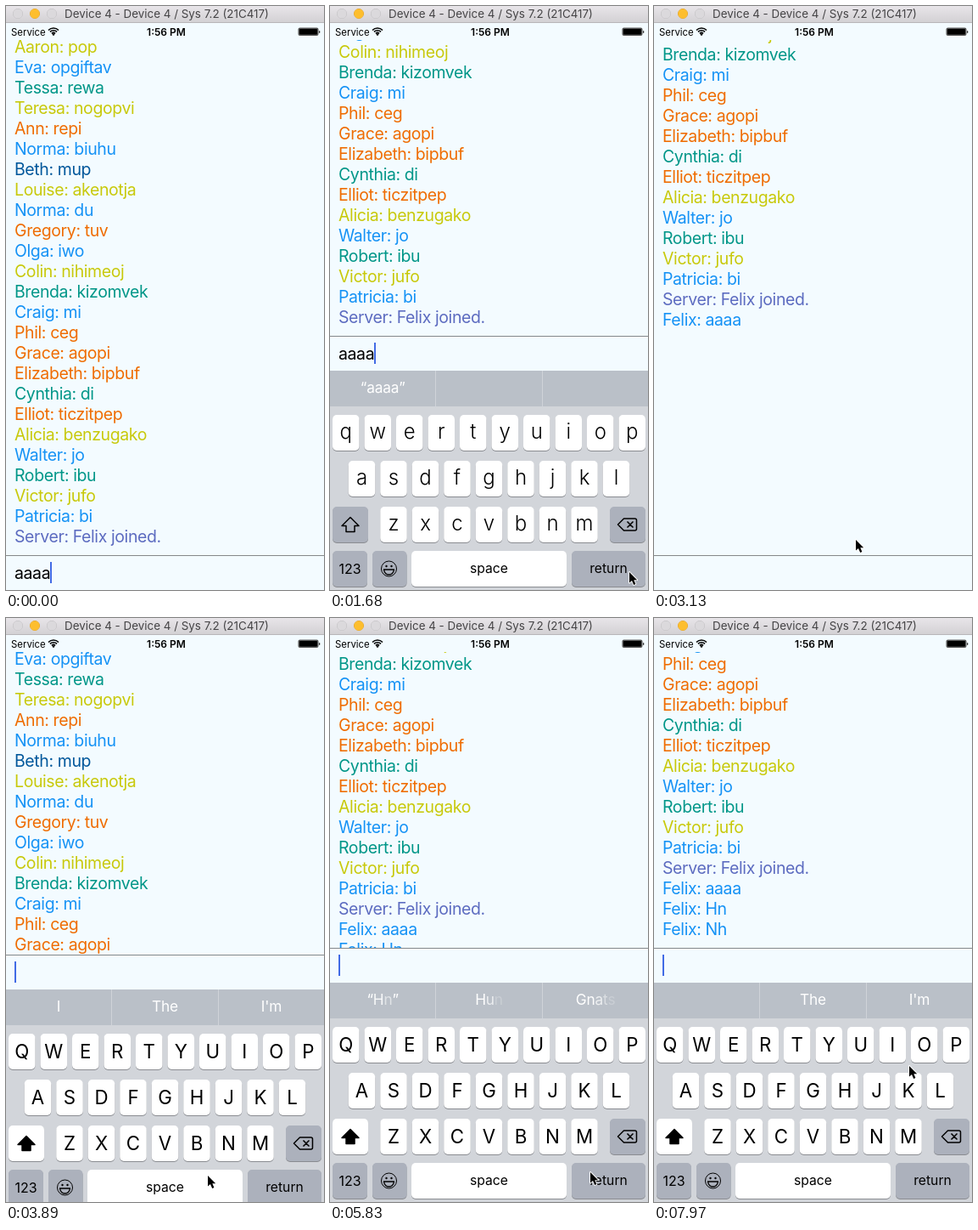
Write an HTML page with a canvas that moves like this. It is 375x687 px and loops after 8000 ms.

```html
<!DOCTYPE html>
<html lang="en">
<head>
<meta charset="utf-8">
<title>Chat keyboard</title>
<style>
  html, body { margin: 0; width: 100%; height: 100%; overflow: hidden; background: #f3fbff; }
  canvas { display: block; }
</style>
</head>
<body>
<canvas id="stage" width="375" height="687"></canvas>
<script>
const ctx = document.getElementById('stage').getContext('2d');
const W = 375, H = 687, LOOP = 8000, KEYBOARD = 258, ROW = 24;
const PAPER = '#f3fbff', KEY_GRAY = '#acb1bc';
const COLORS = { y: '#c8c90a', b: '#1592f5', t: '#009688', o: '#ef6c00', n: '#01579b', i: '#5c6bc0' };

const messages = [
  'y Aaron: pop', 'b Eva: opgiftav', 't Tessa: rewa', 'y Teresa: nogopvi', 'o Ann: repi',
  'b Norma: biuhu', 'n Beth: mup', 'y Louise: akenotja', 'b Norma: du', 'o Gregory: tuv',
  'b Olga: iwo', 'y Colin: nihimeoj', 't Brenda: kizomvek', 'b Craig: mi', 'o Phil: ceg',
  'o Grace: agopi', 'o Elizabeth: bipbuf', 't Cynthia: di', 'o Elliot: ticzitpep',
  'y Alicia: benzugako', 'b Walter: jo', 't Robert: ibu', 'y Victor: jufo', 'b Patricia: bi',
  'i Server: Felix joined.', 'b Felix: aaaa', 'b Felix: Hn', 'b Felix: Nh'
];

// Timelines, all in ms
const sends = [1960, 5800, 7690];
const inputs = [[0, 'aaaa'], [1960, ''], [4860, 'H'], [5640, 'Hn'], [5800, ''],
                [6600, 'N'], [7150, 'Nh'], [7690, '']];
const suggestions = [
  [-500, ['“aaaa”', '', '']], [1960, ['', '', '']], [2180, ['I', 'The', 'I\'m']],
  [4900, ['“H”', 'He', 'Have']], [5725, ['“Hn”', 'Hun', 'Gnats']], [5960, ['I', 'The', 'I\'m']],
  [6650, ['“N”', 'No', 'Not']], [7200, ['“Nh”', 'Nah', 'Night']], [7760, ['', 'The', 'I\'m']]
];
const presses = [[1910, 1960, 'return'], [4760, 4860, 'H'], [5550, 5640, 'n'], [5765, 5800, 'return'],
                 [6500, 6600, 'N'], [7050, 7150, 'h'], [7640, 7690, 'return']];
const scrolls = [[830, 258], [1970, 24], [3115, -258], [3970, 258], [5825, 24], [7700, 24]];
const pointerPath = [
  [60, 183, 690], [250, 183, 675], [1200, 183, 675], [1530, 353, 666], [1680, 353, 666],
  [1740, 333, 666], [1930, 333, 666], [2310, 208, 326], [2740, 208, 326], [3130, 238, 628],
  [3400, 238, 656], [3950, 238, 656], [4390, 228, 610], [4600, 226, 558], [5000, 226, 558],
  [5400, 262, 604], [5640, 262, 606], [5760, 307, 652], [6040, 307, 652], [6350, 262, 608],
  [6650, 262, 608], [6900, 226, 558], [7200, 226, 558], [7560, 320, 662], [7700, 320, 662],
  [7970, 301, 527]
];
const KEYBOARD_UP = [450, 3625], KEYBOARD_DOWN = 2700;

const clamp = v => Math.max(0, Math.min(1, v));
const smooth = p => (p = clamp(p), p * p * (3 - 2 * p));
const spring = ms => { const k = Math.max(0, ms) * 0.02; return 1 - (1 + k) * Math.exp(-k); };
const latest = (list, t) => list.filter(e => e[0] <= t).pop();

function setFont(size, weight = 400, spacing = 0) {
  ctx.font = `${weight} ${size}px Inter, "Open Sans", sans-serif`;
  ctx.letterSpacing = spacing + 'px';
}
function text(str, x, y, size, { color = '#000', weight, spacing, align = 'left' } = {}) {
  setFont(size, weight, spacing);
  ctx.fillStyle = color;
  ctx.textAlign = align;
  ctx.fillText(str, x, y);
}
function box(x, y, w, h, color, radius = 0) {
  ctx.fillStyle = color;
  ctx.beginPath();
  ctx.roundRect(x, y, w, h, radius);
  ctx.fill();
}
function shape(d, x, y, fill, stroke, width = 1.5) {
  const path = new Path2D(d);
  ctx.save();
  ctx.translate(x, y);
  ctx.lineWidth = width;
  ctx.lineJoin = 'round';
  if (stroke) { ctx.strokeStyle = stroke; ctx.stroke(path); }
  if (fill) { ctx.fillStyle = fill; ctx.fill(path); }
  ctx.restore();
}
function circle(x, y, r, fill, stroke) {
  shape(`M${-r} 0a${r} ${r} 0 1 0 ${2 * r} 0a${r} ${r} 0 1 0 ${-2 * r} 0z`, x, y, fill, stroke, 1);
}

function drawTop() {
  const shade = ctx.createLinearGradient(0, 0, 0, 20);
  shade.addColorStop(0, '#e8e5e9');
  shade.addColorStop(1, '#d2d0d3');
  box(0, 0, W, 20, shade);
  box(0, 19, W, 1, '#b8b6b9');
  circle(14, 9, 5.5, '#dbd9dc', '#c0bec1');
  circle(34, 9, 5.5, '#fdbe2e', '#e0a028');
  circle(54, 9, 5.5, '#dbd9dc', '#c0bec1');
  text('Device 4 - Device 4 / Sys 7.2 (21C417)', 69, 14, 13.4, { color: '#454446' });

  text('Service', 6, 34.5, 11.4);
  for (const r of [3, 5.8, 8.6])
    shape(`M${-r * .7} ${-r * .7}A${r} ${r} 0 0 1 ${r * .7} ${-r * .7}`, 56, 34.5, null, '#000', 1.6);
  circle(56, 33.5, 1.3, '#000');
  text('1:56 PM', 189, 34.5, 12, { weight: 600, align: 'center' });
  box(344.5, 25.5, 24, 9.5, '#555', 2);
  box(346, 27, 21, 6.5, '#000', 1);
  box(369, 29, 1.3, 3, '#333', 1);
}

function drawMessages(t, bar) {
  const offset = Math.round(scrolls.reduce((s, [at, by]) => s + by * smooth((t - at) / 270), 0));
  const count = 25 + sends.filter(at => at <= t).length;
  ctx.save();
  ctx.beginPath();
  ctx.rect(0, 40, W, bar - 40);
  ctx.clip();
  messages.slice(0, count).forEach((m, i) =>
    text(m.slice(2), 10, 55 + i * ROW - offset, 19.5, { color: COLORS[m[0]], spacing: -0.4 }));
  ctx.restore();
}

function caretAlpha(t, since) {
  const p = (t - since) % 890;
  return p < 570 ? 1 - clamp((p - 380) / 190) : clamp((p - 750) / 140);
}
function drawInput(t, bar) {
  const [edited, value] = latest(inputs, t);
  box(0, bar, W, 41, PAPER);
  box(0, bar, W, 1, '#85888a');
  text(value, 10, bar + 28, 19.5, { spacing: -0.4 });
  if (t >= KEYBOARD_DOWN && t < KEYBOARD_UP[1]) return;
  const caretX = Math.floor(10 + ctx.measureText(value).width);
  const since = edited === 0 ? -320 : t < KEYBOARD_DOWN ? edited : Math.max(edited, KEYBOARD_UP[1]);
  ctx.globalAlpha = caretAlpha(t, since);
  box(caretX, bar + 8, 2, 25, '#426be5');
  ctx.globalAlpha = 1;
}

function drawSuggestions(t, top) {
  box(0, top, W, 42, '#bac0c8');
  box(124, top, 1, 42, '#cfd3d9');
  box(250, top, 1, 42, '#cfd3d9');
  const [since, words] = latest(suggestions, t);
  const progress = clamp((t - since) / 172);
  setFont(17.3, 400, -0.2);
  ctx.fillStyle = '#fff';
  ctx.textAlign = 'left';
  words.forEach((word, slot) => {
    const left = [62, 187.5, 313][slot] - ctx.measureText(word).width / 2;
    [...word].forEach((ch, i) => {
      const lag = i / Math.max(1, word.length - 1);
      ctx.globalAlpha = ch === '”' ? 1 : clamp(progress * 2 - lag);
      ctx.fillText(ch, left + ctx.measureText(word.slice(0, i)).width, top + 26);
    });
  });
  ctx.globalAlpha = 1;
}

function key(x, y, w, color = '#fff') {
  box(x, y + 1, w, 42, '#8a8c91', 5);
  box(x, y, w, 42, color, 5);
}
function popup(letter, x, y) {
  ctx.save();
  ctx.shadowColor = 'rgba(0,0,0,.35)';
  ctx.shadowBlur = 3;
  shape('M-5-56h41.5q6 0 6 6v32q0 7-6 12t-5 12v31q0 5-5 5h-21.5q-5 0-5-5v-31q0-7-5-12t-6-12v-32q0-6 6-6z',
    x, y, '#fff');
  ctx.restore();
  text(letter, x + 15.75, y - 17, 34, { weight: 300, align: 'center' });
}
function drawKeyboard(t, top) {
  const upper = latest(inputs, t)[1] === '';
  const pressed = (presses.find(([from, to]) => t >= from && t < to) || [])[2];
  const y = row => top + [52, 106, 160, 212][row];
  const label = { align: 'center', weight: 400 };
  box(0, top, W, KEYBOARD, '#d2d5da');
  drawSuggestions(t, top);

  let raised = null;
  [['QWERTYUIOP', 3], ['ASDFGHJKL', 21.75], ['ZXCVBNM', 59.25]].forEach(([letters, left], row) =>
    [...letters].forEach((capital, i) => {
      const x = left + 37.5 * i, letter = upper ? capital : capital.toLowerCase();
      key(x, y(row), 31.5);
      if (upper) text(letter, x + 15.75, y(row) + 29, 22.3, label);
      else text(letter, x + 15.75, y(row) + 28, 24, { align: 'center', weight: 300 });
      if (pressed === letter) raised = [letter, x, y(row)];
    }));

  key(3, y(2), 42, upper ? '#fff' : KEY_GRAY);
  shape('M0-9L10 1H5V8H-5V1H-10Z', 24, y(2) + 21.5, upper ? '#000' : null, '#000');
  key(330, y(2), 42, KEY_GRAY);
  shape('M-11 0L-4-7H9Q11-7 11-5V5Q11 7 9 7H-4ZM0-3.5L7 3.5M7-3.5L0 3.5', 350.5, y(2) + 21, null, '#000');

  key(3, y(3), 41, KEY_GRAY);
  text('123', 23.5, y(3) + 27, 16, label);
  key(50, y(3), 40.5, KEY_GRAY);
  circle(69.5, y(3) + 21, 9, null, '#000');
  circle(66.5, y(3) + 18, 1.2, '#000');
  circle(72.5, y(3) + 18, 1.2, '#000');
  shape('M-6 0H6Q5 6 0 6T-6 0Z', 69.5, y(3) + 22, null, '#000', 1.3);
  key(96, y(3), 183);
  text('space', 187.5, y(3) + 26, 15.7, label);
  key(285, y(3), 87, pressed === 'return' ? '#fff' : KEY_GRAY);
  text('return', 328.5, y(3) + 26, 15.7, label);
  if (raised) popup(...raised);
}

function drawPointer(t) {
  if (t < pointerPath[0][0]) return;
  const from = latest(pointerPath, t);
  const to = pointerPath[pointerPath.indexOf(from) + 1] || from;
  const p = smooth((t - from[0]) / (to[0] - from[0] || 1));
  const [x, y] = [1, 2].map(k => Math.round(from[k] + (to[k] - from[k]) * p));
  shape('M0 0V12.5L3 10L5.2 15L7.4 14L5.3 9.2H9.2Z', x, y, '#000', '#fff', 1.8);
}

function draw(t) {
  const lift = spring(t - KEYBOARD_UP[0]) - spring(t - KEYBOARD_DOWN) + spring(t - KEYBOARD_UP[1]);
  const bar = Math.round(646 - KEYBOARD * lift);
  box(0, 0, W, H, PAPER);
  drawMessages(t, bar);
  drawTop();
  drawInput(t, bar);
  if (bar < 646) drawKeyboard(t, bar + 41);
  drawPointer(t);
}

const start = performance.now();
function tick() {
  draw((performance.now() - start) % LOOP);
  requestAnimationFrame(tick);
}
tick();
</script>
</body>
</html>
```
